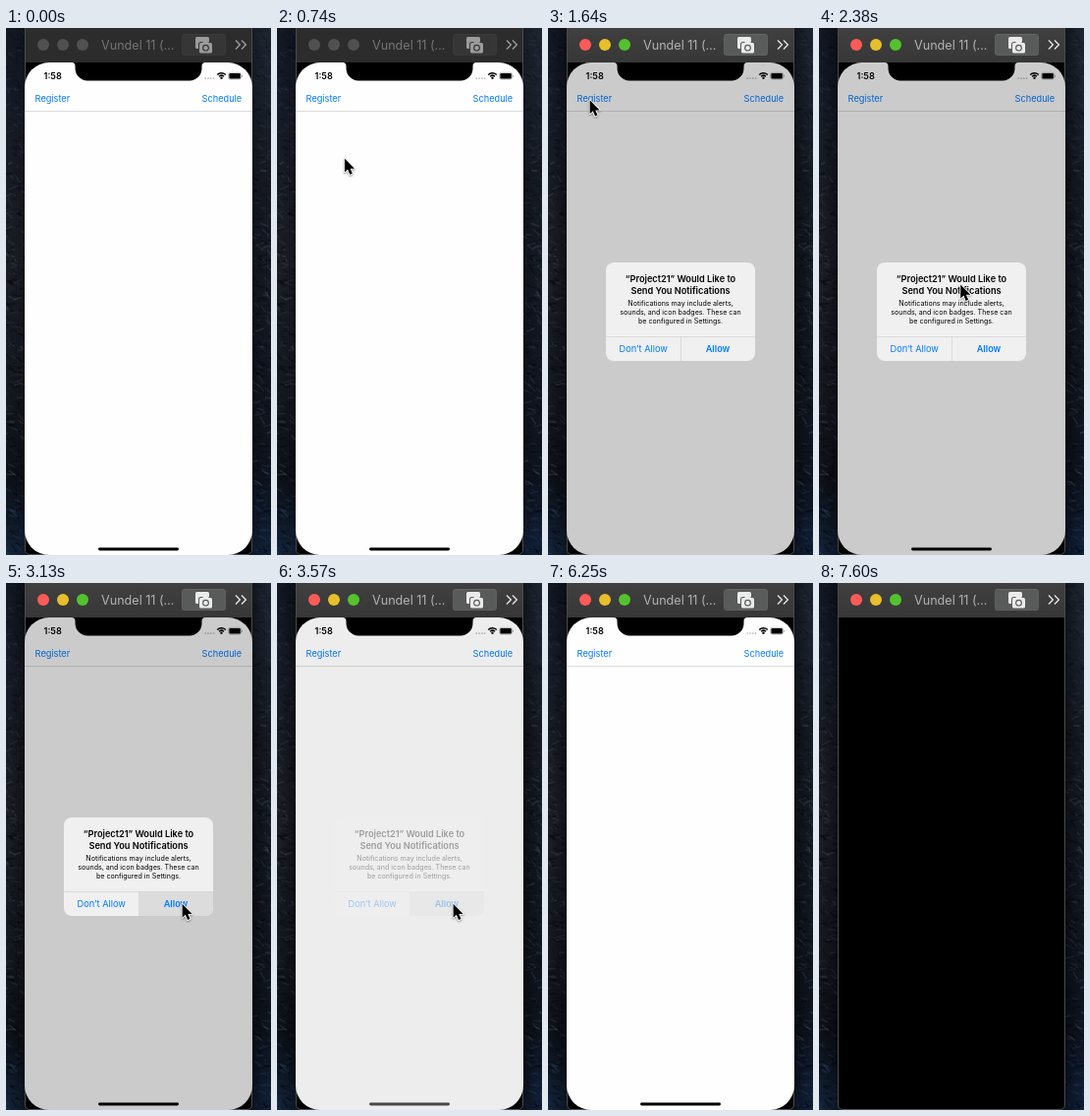
Write an HTML page with a canvas that moves like this. It is 270 px wide and 535 px high and loops after 8 s.

```html
<!DOCTYPE html>
<html lang="en">
<head>
<meta charset="utf-8">
<title>Notification permission demo</title>
<style>
html, body { margin: 0; width: 100%; height: 100%; overflow: hidden; background: #10141c; }
canvas { display: block; width: 270px; height: 535px; }
</style>
</head>
<body>
<canvas id="stage"></canvas>
<script>
const W = 270, H = 535, LOOP = 8000, STEP = 148.5;
const BLUE = '#007aff';
const scale = Math.max(1, window.devicePixelRatio || 1);
const stage = document.getElementById('stage');
const ctx = sized(stage);

function sized(canvas) {
  canvas.width = W * scale;
  canvas.height = H * scale;
  const c = canvas.getContext('2d');
  c.scale(scale, scale);
  return c;
}

function rand(seed) {
  return () => {
    seed = (seed * 1664525 + 1013904223) >>> 0;
    return seed / 4294967296;
  };
}

function box(x, y, w, h, r, fill) {
  ctx.beginPath();
  ctx.roundRect(x, y, w, h, r);
  ctx.fillStyle = fill;
  ctx.fill();
}

function disc(x, y, r, fill) {
  ctx.beginPath();
  ctx.arc(x, y, r, 0, Math.PI * 2);
  ctx.fillStyle = fill;
  ctx.fill();
}

function text(str, x, y, size, fill, weight = 400, align = 'left') {
  ctx.font = `${weight} ${size}px Inter, Roboto, sans-serif`;
  ctx.textAlign = align;
  ctx.fillStyle = fill;
  ctx.fillText(str, x, y);
}

function vertical(c, y0, y1, colors) {
  const g = c.createLinearGradient(0, y0, 0, y1);
  colors.forEach((col, i) => g.addColorStop(i / (colors.length - 1), col));
  return g;
}

// Dark rocky wallpaper, visible as a strip on both sides of the window
const wallpaper = document.createElement('canvas');
(function paintWallpaper() {
  const c = sized(wallpaper), rnd = rand(21);
  const sides = [
    [0, ['#121722', '#161c28', '#181c25', '#1b1e25', '#171b23', '#14181f', '#0d1118', '#14243a']],
    [251, ['#1d2430', '#1a212d', '#161a23', '#151a24', '#121721', '#10151f', '#0e141f', '#11213a']]
  ];
  for (const [x0, colors] of sides) {
    c.save();
    c.beginPath();
    c.rect(x0, 0, 20, H);
    c.clip();
    c.fillStyle = vertical(c, 0, H, colors);
    c.fillRect(x0, 0, 20, H);
    for (let i = 0; i < 620; i++) {
      const x = x0 + rnd() * 22 - 2, y = rnd() * H;
      const rough = y > 120 ? 1 : 0.5;
      const a = rnd() * 0.28 * rough;
      const len = 2 + rnd() * 8, tilt = (rnd() - 0.3) * 1.6;
      c.strokeStyle = rnd() < 0.6 ? `rgba(0,2,8,${a * 1.5})`
        : y > 465 ? `rgba(60,95,140,${a})` : `rgba(95,105,125,${a})`;
      c.lineWidth = 0.6 + rnd() * 1.6;
      c.beginPath();
      c.moveTo(x, y);
      c.lineTo(x + len * Math.cos(tilt), y + len * Math.sin(tilt));
      c.stroke();
    }
    c.restore();
  }
})();

function shadow(active) {
  const a = active ? 0.42 : 0.22;
  for (const [edge, far] of [[19, 2], [251, 268]]) {
    const g = ctx.createLinearGradient(edge, 0, far, 0);
    g.addColorStop(0, `rgba(0,0,0,${a})`);
    g.addColorStop(1, 'rgba(0,0,0,0)');
    ctx.fillStyle = g;
    ctx.fillRect(Math.min(edge, far), 0, 17, H);
  }
}

function cameraIcon(fill, back) {
  box(193, 9, 14, 12, 1.5, fill);
  box(196, 14, 15, 12.5, 2.5, back);
  box(197, 15, 13, 10.5, 1.5, fill);
  box(200.5, 13.3, 6, 3, 1.2, fill);
  disc(203.5, 20.2, 3.4, back);
  disc(203.5, 20.2, 2.2, fill);
}

function titleBar(active) {
  ctx.fillStyle = active ? vertical(ctx, 0, 35, ['#404040', '#373737']) : '#2c2c2c';
  ctx.fillRect(19, 0, 232, 35);
  const lights = active ? ['#fc5b57', '#e7bf2c', '#54c22f'] : Array(3).fill('#505050');
  lights.forEach((col, i) => disc(38 + 20 * i, 17, 6, col));
  text('Vundel 11 (…', 97, 22, 12.6, active ? '#b3b3b3' : '#757575');
  const face = active ? '#595a5a' : '#363636';
  box(179, 6, 45, 22, 3.5, active ? '#666' : '#3b3b3b');
  box(179.5, 7, 44, 20.5, 3, face);
  cameraIcon(active ? '#ebebeb' : '#9b9b9b', face);
  ctx.strokeStyle = active ? '#e8e8e8' : '#a0a0a0';
  ctx.lineWidth = 1.3;
  ctx.beginPath();
  for (const x of [234, 240]) {
    ctx.moveTo(x, 12.5);
    ctx.lineTo(x + 4.4, 17);
    ctx.lineTo(x, 21.5);
  }
  ctx.stroke();
}

function frameEdge() {
  box(19, 35, 232, 500, [0, 0, 5, 5], '#000');
  ctx.strokeStyle = '#4b4b4b';
  ctx.lineWidth = 1;
  ctx.beginPath();
  ctx.moveTo(19.5, 0);
  ctx.lineTo(19.5, 530);
  ctx.arcTo(19.5, 534.5, 24, 534.5, 4.5);
  ctx.lineTo(246, 534.5);
  ctx.arcTo(250.5, 534.5, 250.5, 530, 4.5);
  ctx.lineTo(250.5, 0);
  ctx.stroke();
}

function statusBar() {
  text('1:58', 38.6, 52, 9.1, '#000', 600);
  for (let i = 0; i < 4; i++) disc(203.2 + i * 2.8, 51, 0.85, '#b0b0b0');
  ctx.strokeStyle = '#000';
  ctx.lineWidth = 1.4;
  for (const r of [3.4, 5.9]) {
    ctx.beginPath();
    ctx.arc(219.5, 51.6, r, -Math.PI * 0.76, -Math.PI * 0.24);
    ctx.stroke();
  }
  disc(219.5, 50.8, 1.2, '#000');
  ctx.strokeStyle = '#999';
  ctx.lineWidth = 0.6;
  ctx.beginPath();
  ctx.roundRect(226.6, 45.3, 13, 6.8, 2);
  ctx.stroke();
  box(227.4, 46, 11.4, 5.4, 1.2, '#000');
  box(240.2, 47.6, 0.8, 2.2, 0.4, '#999');
}

function notch() {
  ctx.beginPath();
  ctx.moveTo(67, 35);
  ctx.quadraticCurveTo(70.5, 35, 70.5, 39);
  ctx.arcTo(70.5, 53.5, 84, 53.5, 12.5);
  ctx.lineTo(186, 53.5);
  ctx.arcTo(199.5, 53.5, 199.5, 39, 12.5);
  ctx.lineTo(199.5, 39);
  ctx.quadraticCurveTo(199.5, 35, 203, 35);
  ctx.fillStyle = '#000';
  ctx.fill();
}

function link(label, x, pressed) {
  ctx.globalAlpha = pressed ? 0.22 : 1;
  text(label, x, 75.3, 9.2, BLUE);
  ctx.globalAlpha = 1;
}

function alertBox(alpha, pressed) {
  ctx.save();
  ctx.globalAlpha = alpha;
  box(59, 238, 152, 100, 8, '#f0f0f0');
  if (pressed) box(136, 313.5, 75, 24.5, [0, 0, 8, 0], '#dcdcdc');
  ctx.fillStyle = '#d2d2d2';
  ctx.fillRect(59, 313, 152, 0.7);
  ctx.fillRect(135, 313, 0.7, 25);
  const mid = (s, x, y, size, col, weight) => text(s, x, y, size, col, weight, 'center');
  mid('“Project21” Would Like to', 135, 258.2, 9.2, '#000', 600);
  mid('Send You Notifications', 135, 270.4, 9.2, '#000', 600);
  ['Notifications may include alerts,',
   'sounds, and icon badges. These can',
   'be configured in Settings.'
  ].forEach((s, i) => mid(s, 135, 282 + 9 * i, 7.1, '#000', 400));
  mid('Don’t Allow', 97.2, 328.8, 9.2, BLUE, 400);
  mid('Allow', 173, 328.8, 9.2, BLUE, 600);
  ctx.restore();
}

function phone(t) {
  const asking = t >= 1640 && t < 3570, fading = t >= 3570 && t < 3720;
  ctx.save();
  ctx.beginPath();
  ctx.roundRect(19, 35, 232, 500, 25);
  ctx.clip();
  ctx.fillStyle = '#fefefe';
  ctx.fillRect(19, 35, 232, 500);
  ctx.fillStyle = '#d4d4d4';
  ctx.fillRect(19, 84, 232, 0.8);
  statusBar();
  link('Register', 29.6, t >= 1340 && t < 1640);
  link('Schedule', 199.6, t >= 4910 && t < 5060);
  if (asking || fading) {
    ctx.fillStyle = `rgba(0,0,0,${asking ? 0.2 : 0.067})`;
    ctx.fillRect(19, 35, 232, 500);
    alertBox(asking ? 1 : 0.34, t >= 3130);
  }
  if (t < 1640 || t >= 1790) box(94, 527.6, 82, 2.9, 1.45, fading ? '#484848' : '#000');
  ctx.restore();
  notch();
}

// Pointer trips: start, end, from, to
const trips = [
  [440, 890, [140, 294], [42, 73]],
  [1640, 2530, [42, 73], [179, 325.5]],
  [4020, 4610, [179, 325.5], [220.5, 73]],
  [5060, 5500, [220.5, 73], [174, 165]]
];

function pointerAt(t) {
  if (t < 440 || t >= 6250) return null;
  const [start, end, a, b] = trips.filter(trip => t >= trip[0]).pop();
  const held = t >= end ? end : start + Math.floor((t - start) / STEP) * STEP;
  const p = Math.min(1, (held - start) / (end - start));
  const e = p * p * (3 - 2 * p);
  return a.map((v, i) => v + (b[i] - v) * e);
}

function pointer([x, y]) {
  ctx.save();
  ctx.translate(x, y);
  ctx.beginPath();
  [[0.6, 0.3], [0.6, 14.2], [3.8, 11.3], [6, 16.6], [8.5, 15.5], [6.3, 10.4], [10.7, 10.4]]
    .forEach(([px, py]) => ctx.lineTo(px, py));
  ctx.closePath();
  ctx.lineJoin = 'round';
  ctx.shadowColor = 'rgba(0,0,0,.4)';
  ctx.shadowBlur = 2 * scale;
  ctx.shadowOffsetY = scale;
  ctx.strokeStyle = '#fff';
  ctx.lineWidth = 1.8;
  ctx.stroke();
  ctx.shadowColor = 'transparent';
  ctx.fillStyle = '#000';
  ctx.fill();
  ctx.restore();
}

function draw(t) {
  const active = t >= 1190;
  ctx.drawImage(wallpaper, 0, 0, W, H);
  shadow(active);
  titleBar(active);
  frameEdge();
  if (t < 7600) phone(t);
  const tip = pointerAt(t);
  if (tip) pointer(tip);
}

function tick() {
  draw(performance.now() % LOOP);
  requestAnimationFrame(tick);
}
tick();
</script>
</body>
</html>
```
